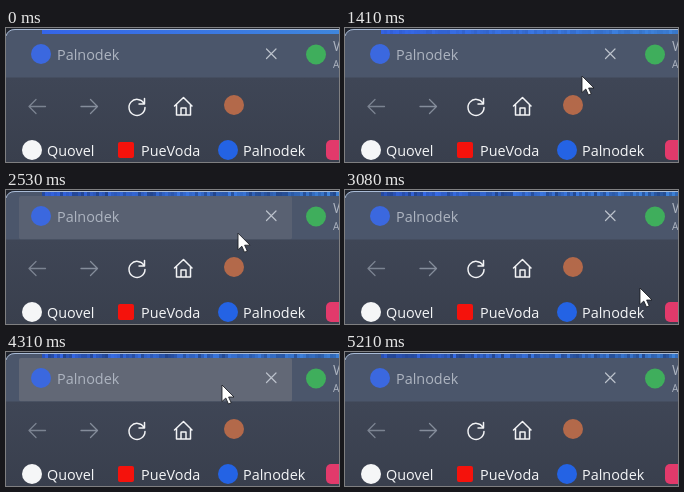
Recreate the animation shown at these times as an HTML page. Size 333 by 134 pixels, loop 5.6 s.

```html
<!DOCTYPE html>
<html lang="en">
<head>
<meta charset="utf-8">
<title>Browser tab hover</title>
<style>
html, body { margin: 0; width: 100%; height: 100%; overflow: hidden; background: #20242d; }
svg { display: block; width: 100vw; height: 100vh; }
text { font-family: "Open Sans", "Noto Sans", sans-serif; font-size: 14.4px; fill: #f4f5f7; }
.dim { fill: #adb4c0; }
.icon { fill: none; stroke: #f2f3f5; stroke-width: 1.5; stroke-linecap: round; stroke-linejoin: round; }
</style>
</head>
<body>
<svg viewBox="0 0 333 134" preserveAspectRatio="none">
  <defs>
    <linearGradient id="bar" x2="0" y2="1">
      <stop stop-color="#3f4656"/><stop offset="1" stop-color="#393f4d"/>
    </linearGradient>
    <linearGradient id="blue">
      <stop stop-color="#3565e8"/><stop offset="1" stop-color="#3f86dc"/>
    </linearGradient>
  </defs>
  <rect width="333" height="134" fill="#20242d"/>
  <path d="M0 134V9Q1 1 9 1H333V134Z" fill="#4b566b"/>
  <rect x="36" y="2" width="297" height="4" fill="url(#blue)"/>
  <g id="strip"></g>
  <path d="M0 8Q2 1.500 9 1.500H333" fill="none" stroke="#a9bbd6"/>
  <rect id="hover" x="13" y="6" width="273" height="43.5" rx="2" fill="#626876"/>
  <rect y="49.5" width="333" height="84.5" fill="url(#bar)"/>

  <circle cx="35" cy="26" r="10" fill="#3b68df"/>
  <text class="dim" x="51" y="32">Palnodek</text>
  <path class="icon" d="M260.500 21l9.500 9.500M270 21l-9.500 9.500" style="stroke:#bcc2cc;stroke-width:1.2"/>
  <circle cx="310" cy="26.5" r="10" fill="#3fae5c"/>
  <text x="327" y="23" class="dim">Wizzlorb</text>
  <text x="327" y="40" class="dim" style="font-size:10px">Audio</text>

  <path class="icon" d="M39.500 78.500H23M30 71.500l-7 7 7 7" style="stroke:#7b8391;stroke-width:1.3"/>
  <path class="icon" d="M75 78.500H91.500M84.500 71.500l7 7-7 7" style="stroke:#858d9b;stroke-width:1.3"/>
  <path class="icon" d="M138 75.500A8 8 0 1 0 139 79.500M138.500 70.500v5.500h-5.500"/>
  <path class="icon" d="M168.500 78L177.500 69.500l8.500 8.500M170.500 76.500V87h14V76.500M175 87V80h5V87"/>
  <circle cx="228" cy="77" r="10" fill="#b3694a"/>

  <circle cx="26" cy="122" r="10" fill="#f5f6f7"/>
  <text x="41" y="127.5">Quovel</text>
  <rect x="112" y="114" width="16" height="16" rx="2" fill="#f5120c"/>
  <text x="135" y="127.5">PueVoda</text>
  <circle cx="222" cy="122" r="10" fill="#2463e4"/>
  <text x="237" y="127.5">Palnodek</text>
  <rect x="320" y="112" width="20" height="20" rx="5" fill="#e23a6b"/>

  <path id="cursor" d="M0 0V16.500L3.800 13 6.500 19 9.200 17.800 6.600 12H12Z" fill="#fff" stroke="#15171c" stroke-width=".8"/>
</svg>
<script>
const LOOP = 5600, STEP = 70;
const el = id => document.getElementById(id);
const clamp = v => Math.max(0, Math.min(1, v));
const smooth = v => v * v * (3 - 2 * v);

// stretches of time in which the picture moves
const runs = [[0, 140], [1130, 2950], [3080, 3980], [4310, 5210]];

// where the pointer rests, and its trips between those places
const out = [318, 134], edge = [237, 48], tab = [210, 24], low = [295, 98], back = [216, 33];
const trips = [
  { start: 1130, end: 1410, from: out, to: edge },
  { start: 1690, end: 2180, from: edge, to: tab },
  { start: 2320, end: 2950, from: tab, to: low },
  { start: 3080, end: 3640, from: low, to: back },
  { start: 4310, end: 5140, from: back, to: out }
];

function pointer(t) {
  const { start, end, from, to } = trips.filter(p => p.start <= t).pop() || trips[0];
  const k = smooth(clamp((t - start) / (end - start)));
  return from.map((v, i) => v + (to[i] - v) * k);
}

// holds the picture between steps
function stepped(t) {
  const [start, end] = runs.filter(r => r[0] <= t).pop();
  return Math.min(end, start + Math.floor((t - start) / STEP) * STEP);
}

function noise(n) {
  const v = Math.sin(n * 12.9898) * 43758.5453;
  return v - Math.floor(v);
}

const bars = Array.from({ length: 99 }, (_, i) => {
  const bar = document.createElementNS("http://www.w3.org/2000/svg", "rect");
  const box = { x: 36 + i * 3, y: 2, width: 3, height: 4, fill: "#1d3a78" };
  for (const key in box) bar.setAttribute(key, box[key]);
  el("strip").append(bar);
  return bar;
});

function draw(t) {
  const busy = clamp((t - 1130) / 1000);
  const seed = Math.floor(t / STEP) * 3.7;
  bars.forEach((bar, i) => bar.setAttribute("opacity", busy * .8 * noise(i + seed)));
  const [x, y] = pointer(t);
  el("hover").setAttribute("opacity", clamp((47 - y) / 6));
  el("cursor").setAttribute("visibility", t >= 1130 && t < 5140 ? "visible" : "hidden");
  el("cursor").setAttribute("transform", `translate(${x} ${y})`);
}

const begin = performance.now();
function tick() {
  draw(stepped((performance.now() - begin) % LOOP));
  requestAnimationFrame(tick);
}
tick();
</script>
</body>
</html>
```
